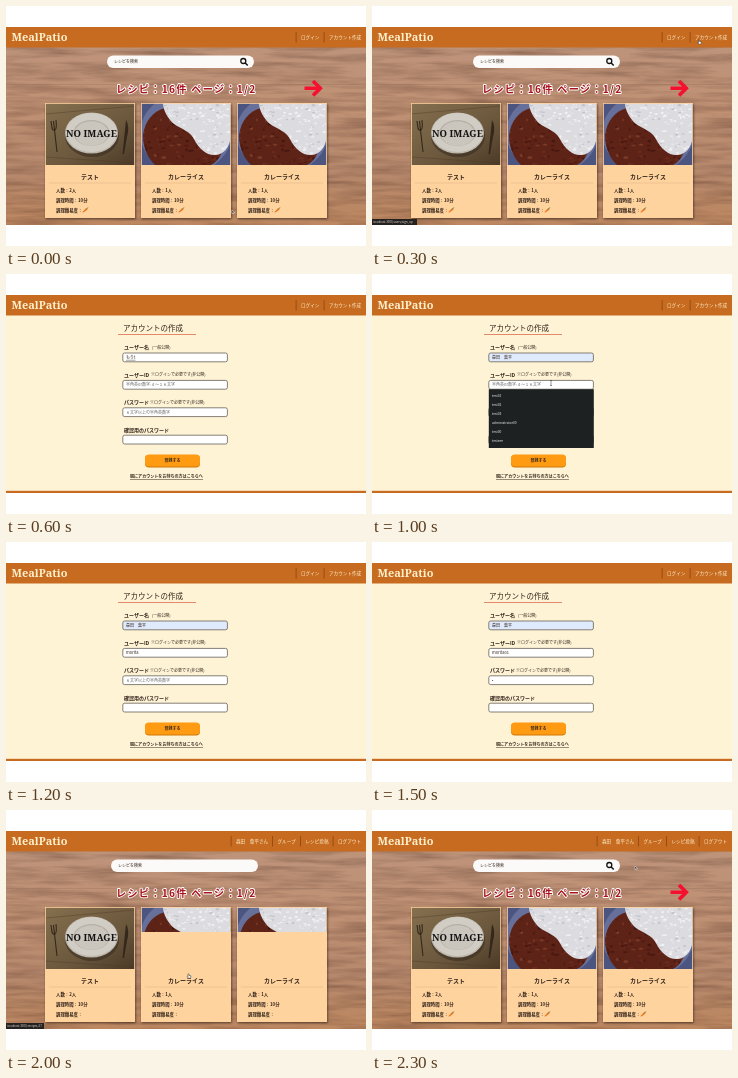
An HTML page for the animation above (2.4 s loop, 360x240 px).

```html
<!DOCTYPE html>
<html lang="ja">
<head>
<meta charset="utf-8">
<title>MealPatio</title>
<style>
html, body { margin: 0; width: 100%; height: 100%; overflow: hidden; background: #fff; }
svg { display: block; width: 360px; height: 240px; }
text { font-family: "Noto Sans CJK JP", "Noto Sans CJK", sans-serif; fill: #33241a; }
.slab { font-family: "Noto Serif", serif; font-weight: 600; }
</style>
</head>
<body>
<svg id="stage" viewBox="0 0 360 240"></svg>
<script>
const text = (x, y, size, s, more = '') => `<text x="${x}" y="${y}" font-size="${size}" ${more}>${s}</text>`;
const rect = (x, y, w, h, fill, more = '') => `<rect x="${x}" y="${y}" width="${w}" height="${h}" fill="${fill}" ${more}/>`;
const path = (d, more) => `<path d="${d}" ${more}/>`;
const ellipse = (x, y, rx, ry, fill, more = '') => `<ellipse cx="${x}" cy="${y}" rx="${rx}" ry="${ry}" fill="${fill}" ${more}/>`;
const group = (id, body) => `<g id="${id}">${body}</g>`;
const bold = 'font-weight="700"', medium = 'font-weight="500"', middle = 'text-anchor="middle"';
const bar = '#c66b20', cream = '#fff0cc';

let seed = 7;
const random = () => (seed = seed * 16807 % 2147483647) / 2147483647;
const specks = (n, colors, max) => Array.from({ length: n }, () =>
  ellipse(random() * 90, random() * 62, .5 + random() * max, .4 + random() * max * .6,
    colors[Math.floor(random() * colors.length)], 'opacity=".6"')).join('');

const riceShape = 'M22 0C22 7 27 16 33 21C40 26 49 28 53 36C58 46 66 53 75 52C82 51 87 46 89 38V0Z';
const sauceShape = 'M2 32C4 18 12 8 24 5L60 20L80 51C78 56 74 60 70 62H14C6 54 2 44 2 32Z';

const defs = `<defs>
  <linearGradient id="wood" x2="0" y2="1"><stop stop-color="#bd937a"/><stop offset=".35" stop-color="#c09174"/>
    <stop offset=".7" stop-color="#b6886c"/><stop offset="1" stop-color="#bd8760"/></linearGradient>
  <linearGradient id="mat" x2="1" y2="1"><stop stop-color="#85704f"/><stop offset=".6" stop-color="#6b573c"/>
    <stop offset="1" stop-color="#4b3927"/></linearGradient>
  <filter id="grain" x="0" y="0" width="1" height="1" color-interpolation-filters="sRGB">
    <feTurbulence type="fractalNoise" baseFrequency=".015 .16" numOctaves="4" seed="4"/>
    <feColorMatrix values="0 0 0 0 .36  0 0 0 0 .23  0 0 0 0 .17  .8 0 0 0 -.3"/></filter>
  <filter id="shade" x="-.2" y="-.2" width="1.4" height="1.4"><feDropShadow dx=".7" dy="1.2" stdDeviation="1" flood-opacity=".5"/></filter>
  <clipPath id="photo"><path d="M0 0H90V62H0Z"/></clipPath>
  <clipPath id="partial"><path d="M0 0H90V25H0Z"/></clipPath>
  <clipPath id="rice"><path d="${riceShape}"/></clipPath>
  <clipPath id="sauce"><path d="${sauceShape}"/></clipPath>
  ${group('curry', rect(0, 0, 90, 62, '#4b5580') + ellipse(45, 30, 46, 40, '#66709b') +
    path(sauceShape, 'fill="#5e2317"') + `<g clip-path="url(#sauce)">${specks(170, ['#3a120c', '#8d4a33', '#4a160e', '#74301f'], 2.2)}</g>` +
    path(riceShape, 'fill="#dcdce0"') + `<g clip-path="url(#rice)">${specks(260, ['#fff', '#b3b5bf', '#f4f4f6'], 1.5)}</g>`)}
  ${group('dish', rect(0, 0, 90, 62, 'url(#mat)') +
    path('M0 11L90 3M0 54L90 60', 'stroke="#4c3a25" stroke-width="1" opacity=".4"') +
    ellipse(47, 33, 27, 21, '#31271c', 'opacity=".5"') + ellipse(46.5, 30, 26.5, 20.5, '#bdb7ac') +
    ellipse(46.5, 29.5, 25.5, 19.5, '#d2cdc4') + ellipse(46.5, 30, 18, 13, '#b5afa5') + ellipse(46.5, 30.5, 17, 12.3, '#cbc6bd') +
    path('M6 18L7 25Q8 28 10 27Q12 26 11 17M8.5 18L12 49', 'fill="none" stroke="#33281b" stroke-width="1.1"') +
    path('M81 17Q85 23 82 34L79 51H77.5Z', 'fill="#33281b"') +
    text(46.5, 33.5, 9.5, 'NO IMAGE', `class="slab" ${middle} style="fill:#111"`))}
</defs>`;

function card(x, title, people, photo, loaded) {
  const partial = !loaded && photo === 'curry';
  const carrot = path('M37.3 109.2L41 105.2L42.6 106.6L38.4 109.5Z', 'fill="#ec741b"') +
    path('M41.2 105.8L43.2 104.7', 'stroke="#7f8b2b" stroke-width="1"');
  return `<g transform="translate(${x} 97)">` +
    rect(0, 0, 90, 115, '#ffd39e', 'filter="url(#shade)"') +
    `<g clip-path="url(#${partial ? 'partial' : 'photo'})"><use href="#${photo}"/></g>` +
    rect(.4, .4, 89.2, 114.2, 'none', 'stroke="#ffd39e" stroke-width=".8"') +
    text(45, 75.6, 6, title, `${bold} ${middle}`) +
    path('M4 80H86', 'stroke="#d9b387" stroke-width=".5"') +
    [`人数：${people}人`, '調理時間：10分', '調理難易度：'].map((s, i) => text(11, 88.8 + i * 10, 4.4, s, bold)).join('') +
    (loaded ? carrot : '') + '</g>';
}

function list(loaded) {
  const x = loaded ? 101 : 105;
  return rect(0, 41, 360, 178, 'url(#wood)') + rect(0, 41, 360, 178, '#000', 'filter="url(#grain)"') +
    path('M0 78.5H360M0 128H360M0 176H360', 'stroke="#684737" stroke-width=".7" opacity=".2"') +
    rect(x, 49.5, 147, 12.5, '#fbfaf8', 'rx="6.25"') + text(x + 7, 57.3, 4, 'レシピを検索', medium) +
    text(110, 87, 10.2, 'レシピ：16件 ページ：1/2', `${bold} letter-spacing="1.25" stroke="#fff" stroke-width="1.8" stroke-linejoin="round" paint-order="stroke" style="fill:#a8121c"`) +
    (loaded ? '<circle cx="237.3" cy="55" r="2.5" fill="none" stroke="#111" stroke-width="1.3"/>' +
      path('M239.2 57L241.7 59.5', 'stroke="#111" stroke-width="1.5"') +
      path('M298.5 82.3H314M307 75L314.3 82.3L307 89.6', 'fill="none" stroke="#f4102e" stroke-width="3.6"') : '') +
    card(39, 'テスト', 2, 'dish', loaded) + card(135, 'カレーライス', 1, 'curry', loaded) + card(231, 'カレーライス', 1, 'curry', loaded);
}

const header = rect(0, 21, 360, 20.5, bar) + text(5.5, 35, 11, 'MealPatio', `class="slab" style="fill:${cream}"`);
const nav = items => items.map(([x, s]) =>
  rect(x - 5.3, 26, .8, 10.5, '#8a4713') + text(x, 33, 4.6, s, `${medium} style="fill:${cream}"`)).join('');

const form = rect(0, 41, 360, 178, '#fff3d6') + rect(0, 216.8, 360, 2.2, bar) +
  text(117, 56.5, 7.5, 'アカウントの作成', medium) + rect(112, 60, 78, .8, '#dc7050') +
  [['ユーザー名', 146, '(一般公開)'], ['ユーザーID', 145, '※ログインで必要です(非公開)'],
   ['パスワード', 144, '※ログインで必要です(非公開)'], ['確認用のパスワード', 0, '']]
    .map(([name, x, hint], i) => text(118, 75 + i * 27.5, 5, name, bold) + text(x, 74.9 + i * 27.5, 4, hint, medium)).join('') +
  rect(139, 181, 55, 12.6, '#cf7605', 'rx="4"') + rect(139, 180.4, 55, 12, '#ff9b12', 'rx="4"') +
  text(166.5, 188, 4, '登録する', `${bold} ${middle}`) +
  text(124, 204, 4.05, '既にアカウントをお持ちの方はこちらへ', bold) + rect(124, 205.3, 73, .5, '#33241a');

function field(i, value, hint, fill, more = '') {
  const y = 79 + i * 27.4;
  return rect(116.8, y, 104.6, 8.8, fill, 'rx="1.8" stroke="#65615a" stroke-width=".8"') +
    text(120, y + 5.9, 4, value || hint, `${medium} ${more}` + (value ? '' : ' style="fill:#666"'));
}

const menu = rect(116.8, 115.2, 105, 58.8, '#1d2121') +
  ['test01', 'test02', 'test03', 'administrator00', 'test00', 'testeee'].map((s, i) =>
    text(120, 123.2 + i * 9.05, 3.3, s, `${medium} style="fill:#f2f2f2"`)).join('');

function fields(step) {
  const names = ['', 'も', 'もりt', '森田', '森田　葉平'];
  const name = names[Math.min(step - 4, 4)];
  const id = step < 11 ? '' : 'morita01'.slice(0, [3, 6][step - 11] || 8);
  const dots = n => '•'.repeat(Math.max(0, Math.min(n, 8)));
  const composing = step === 5 || step === 6 ? 'text-decoration="underline"' : '';
  return field(0, name, '', step > 7 ? '#e0eafd' : '#fff', composing) +
    field(1, id, '半角英or数字:４〜１６文字', '#fff') +
    field(2, dots((step - 15) * 7 + 1), '６文字以上の半角英数字', '#fff') +
    field(3, dots((step - 17) * 7 + 1), '', '#fff') +
    (step === 9 || step === 10 ? menu : '');
}

const status = (w, s) => rect(0, 213, w, 6, '#25211f') + text(1, 217, 2.9, s, 'style="fill:#ddd"');

const shapes = {
  arrow: ['M0 0V3.5L.8 2.8L1.4 4L2 3.7L1.4 2.5H2.5Z', '#111', '#fff'],
  hand: ['M0 0Q.7 -.6 1 .2V1.4L2.8 1.8V3.2L2.2 4.2H.4L-.8 2.5L-.3 2.1L0 2.5Z', '#fff', '#222'],
  beam: ['M-1 -2.5H1M0 -2.5V2.5M-1 2.5H1', 'none', '#333'],
  hidden: ['', 'none', 'none']
};
// Pointer stops: step, x, y, shape; it hides while typing
const stops = [[0, 226, 204, 'arrow'], [3, 326.5, 34, 'hand'], [4, 190, 84, 'hidden'], [8, 187, 94, 'beam'],
  [10, 179, 109, 'beam'], [11, 182, 165, 'hidden'], [19, 170, 186, 'hand'],
  [20, 182, 164, 'hand'], [21, 200, 140, 'arrow'], [23, 263, 56, 'arrow'], [24, 263, 56, 'arrow']];

function pointer(step) {
  const i = stops.findIndex((s, k) => step >= s[0] && step < stops[k + 1][0]);
  const [a, b] = [stops[i], stops[i + 1]];
  const p = (step - a[0]) / (b[0] - a[0]);
  const [d, fill, stroke] = shapes[a[3]];
  return path(d, `transform="translate(${a[1] + (b[1] - a[1]) * p} ${a[2] + (b[2] - a[2]) * p})" fill="${fill}" stroke="${stroke}" stroke-width=".5"`);
}

const stage = document.getElementById('stage');
stage.innerHTML = defs + group('full', list(true)) + group('loading', list(false)) + group('form', form) + header +
  group('guest', nav([[295, 'ログイン'], [323, 'アカウント作成']])) +
  group('member', nav([[230, '森田　葉平さん'], [271.5, 'グループ'], [299.5, 'レシピ投稿'], [332, 'ログアウト']])) +
  group('live', '');
const part = id => document.getElementById(id);
const show = (id, on) => part(id).style.display = on ? '' : 'none';

function draw(step) {
  const signing = step > 3 && step < 20;
  show('form', signing);
  show('loading', step === 20);
  show('full', !signing && step !== 20);
  show('guest', step < 20);
  show('member', step >= 20);
  part('live').innerHTML = (signing ? fields(step) : '') +
    (step === 3 ? status(45, 'localhost:3000/users/sign_up') : step === 20 ? status(38, 'localhost:3000/recipes/17') : '') +
    pointer(step);
}

let last = -1, start = performance.now();
function tick() {
  const step = Math.floor((performance.now() - start) % 2400 / 100);
  if (step !== last) draw(last = step);
  requestAnimationFrame(tick);
}
tick();
</script>
</body>
</html>
```
